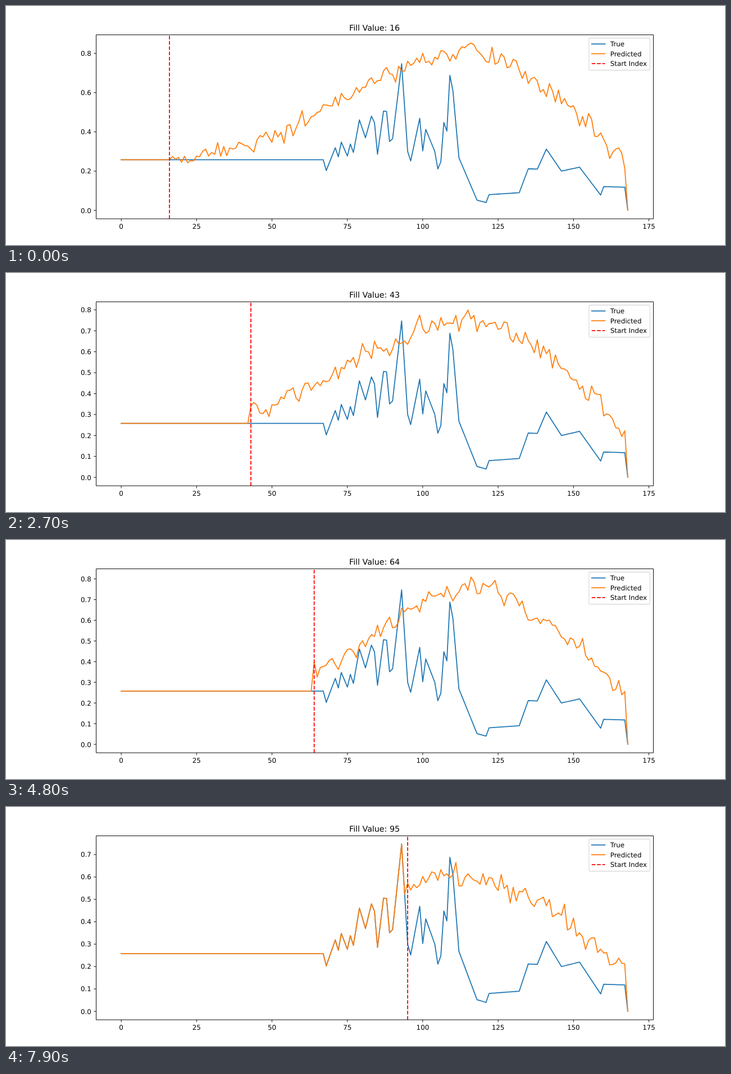
Recreate the animation shown at these times as an HTML page. Size 1280 px wide and 427 px high, loop 8 s.

```html
<!DOCTYPE html>
<html lang="en">
<head>
<meta charset="utf-8">
<title>Fill value chart</title>
<style>
  html, body { margin: 0; width: 100%; height: 100%; overflow: hidden; background: #fff; }
  svg { display: block; width: 100vw; height: 100vh; }
  text { font: 11.85px "DejaVu Sans", sans-serif; fill: #000; text-rendering: geometricPrecision; }
  .title { font-size: 14.22px; text-anchor: middle; }
  .mid { text-anchor: middle; }
  .end { text-anchor: end; }
  .axis { fill: none; stroke: #000; stroke-width: .95; }
  .line { fill: none; stroke-width: 1.78; stroke-linejoin: round; stroke-linecap: square; }
  .true { stroke: #1f77b4; }
  .pred { stroke: #ff7f0e; }
  .start { stroke: #f00; stroke-linecap: butt; stroke-dasharray: 6.58 2.84; }
</style>
</head>
<body>
<svg viewBox="0 0 1280 427">
  <text id="title" class="title" x="656" y="44.3"></text>
  <g id="xTicks"></g>
  <g id="yTicks"></g>
  <path id="true" class="line true"/>
  <path id="pred" class="line pred"/>
  <path id="start" class="line start"/>
  <path class="axis" d="M160.5 51.5H1152.5V380.2H160.5Z"/>
  <rect x="1037.8" y="57.4" width="108.6" height="57.2" rx="2.4" fill="#fff" fill-opacity=".8" stroke="#ccc" stroke-opacity=".8" stroke-width="1.1"/>
  <g id="legend"></g>
</svg>
<script>
const STEP_MS = 100, STEPS = 80, FIRST = 16, LAST_INDEX = 168;
const BASE_Y = 365.1, PLOT_H = 298.9;
const $ = id => document.getElementById(id);
const px = i => 205.1 + 5.368 * i;
const mix = (a, b, k) => a + (b - a) * k;
const clamp = k => Math.min(1, Math.max(0, k));
const smooth = k => k * k * (3 - 2 * k);

// Turning points of the true series, joined by straight lines.
const turns = [
  [0, .258], [67, .258], [68, .203], [71, .319], [72, .273], [73, .348], [75, .277],
  [76, .338], [77, .295], [79, .461], [81, .37], [83, .48], [84, .447], [85, .286],
  [87, .506], [88, .504], [89, .351], [90, .365], [93, .747], [95, .3], [96, .252],
  [99, .469], [100, .303], [101, .413], [104, .3], [105, .211], [106, .247], [107, .448],
  [108, .404], [109, .688], [110, .61], [112, .268], [118, .052], [121, .04], [122, .08],
  [132, .09], [135, .212], [138, .21], [141, .312], [146, .2], [152, .22], [159, .078],
  [160, .121], [167, .118], [LAST_INDEX, 0]
];
const truth = Array.from({ length: LAST_INDEX + 1 }, (_, i) => {
  const b = Math.max(1, turns.findIndex(p => p[0] >= i));
  const [x0, y0] = turns[b - 1], [x1, y1] = turns[b];
  return mix(y0, y1, (i - x0) / (x1 - x0));
});

function seeded(seed) {
  return () => {
    seed = (seed + 0x6D2B79F5) | 0;
    let t = Math.imul(seed ^ (seed >>> 15), 1 | seed);
    t = (t + Math.imul(t ^ (t >>> 7), 61 | t)) ^ t;
    return ((t ^ (t >>> 14)) >>> 0) / 4294967296;
  };
}

// True values up to the fill index, then a noisy hump that flattens for late fills.
function forecast(fill) {
  const rand = seeded(fill * 7919);
  const late = clamp((fill - 64) / 18);
  const sway = .035 * Math.cos(2 * Math.PI * (fill - 15) / 40);
  const cap = mix(.818 + sway - .0003 * (fill - FIRST), .665, late);
  const top = cap - mix(.04, .06, late);
  const riseFrom = Math.min(70, Math.max(25, fill - 12));
  const riseTo = mix(117, 105, late);

  const hump = i => {
    const rise = smooth(clamp((i - riseFrom) / (riseTo - riseFrom)));
    const fall = 1 - .7 * clamp((i - 115) / 52) ** 1.6;
    return mix(.29, top, rise) * fall;
  };
  const pred = truth.map((v, i) => {
    if (i < fill || i === LAST_INDEX) return v;
    const y = hump(i) + .055 * (rand() + rand() + rand() - 1.5);
    return y > cap ? 2 * cap - y : y;
  });
  const ahead = pred.slice(fill);
  pred[fill + ahead.indexOf(Math.max(...ahead))] = cap;
  return pred;
}

function draw(step) {
  const fill = FIRST + step;
  const pred = forecast(fill);
  const max = Math.max(...truth, ...pred);
  const py = v => BASE_Y - v / max * PLOT_H;
  const path = data => "M" + data.map((v, i) => px(i).toFixed(2) + " " + py(v).toFixed(2)).join("L");

  $("title").textContent = "Fill Value: " + fill;
  $("true").setAttribute("d", path(truth));
  $("pred").setAttribute("d", path(pred));
  $("start").setAttribute("d", `M${px(fill)} 380V51.3`);

  const gap = max * 1.1 > .9 ? 2 : 1;
  let ticks = "";
  for (let n = 0; n / 10 <= max * 1.05; n += gap) {
    const y = py(n / 10);
    ticks += `<path class="axis" d="M160.5 ${y}h-4.2"/><text class="end" x="151.9" y="${y + 4.4}">${(n / 10).toFixed(1)}</text>`;
  }
  $("yTicks").innerHTML = ticks;
}

for (let n = 0; n <= 175; n += 25) {
  $("xTicks").innerHTML += `<path class="axis" d="M${px(n)} 380.2v4.2"/><text class="mid" x="${px(n)}" y="398.2">${n}</text>`;
}
[["true", "True"], ["pred", "Predicted"], ["start", "Start Index"]].forEach(([kind, label], j) => {
  const y = 67.8 + j * 17.5;
  $("legend").innerHTML += `<path class="line ${kind}" d="M1042.7 ${y}h23.7"/><text x="1075.8" y="${y + 4.2}">${label}</text>`;
});

let shown = -1;
function tick() {
  const step = Math.floor(performance.now() / STEP_MS) % STEPS;
  if (step !== shown) draw(shown = step);
  requestAnimationFrame(tick);
}
tick();
</script>
</body>
</html>
```
